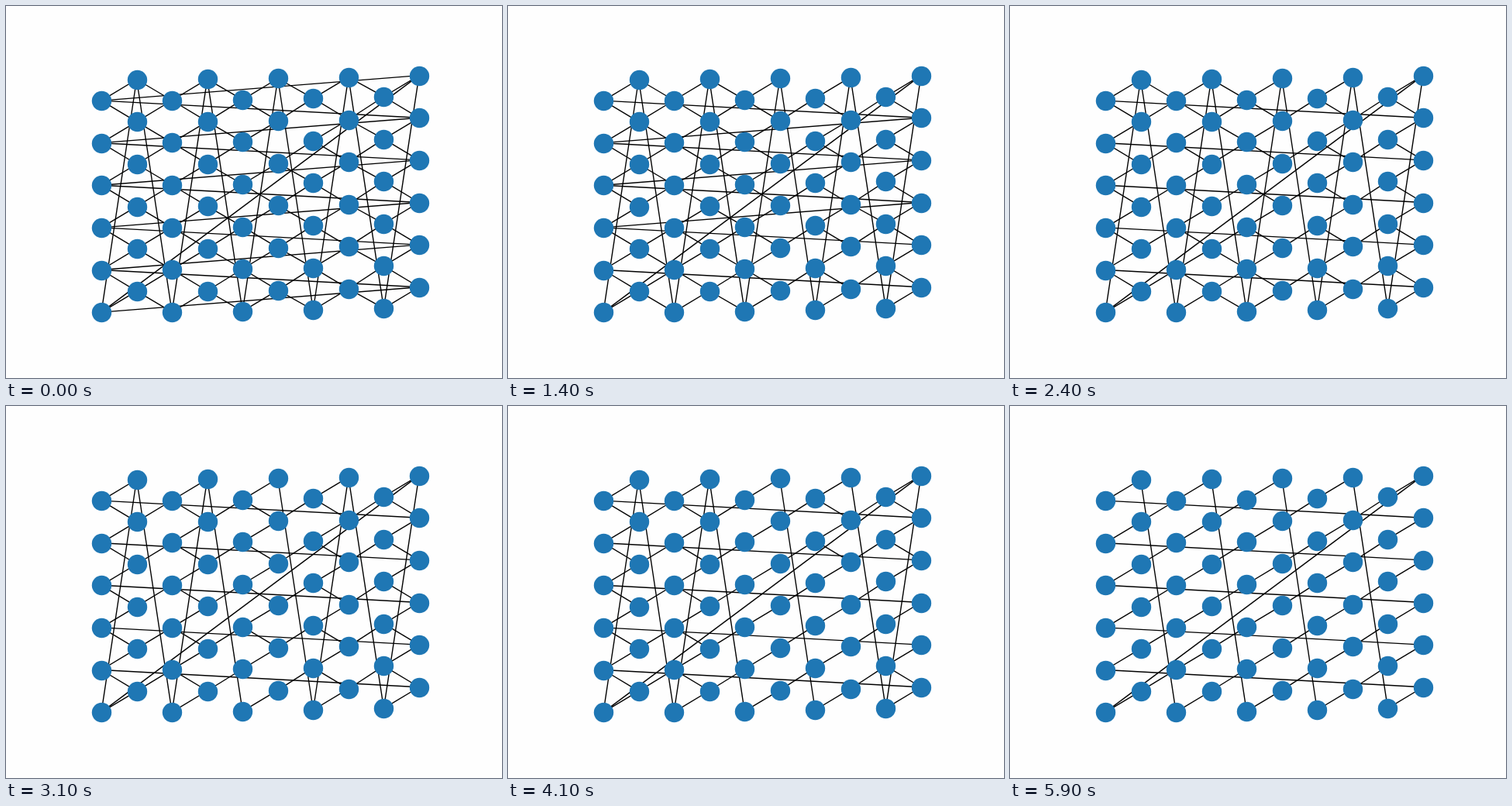
Write an HTML page with a canvas that moves like this. It is 640 px wide and 480 px high and loops after 6 s.

```html
<!DOCTYPE html>
<html lang="en">
<head>
<meta charset="utf-8">
<title>Thinning a circulant graph</title>
<style>
html, body { margin: 0; width: 100%; height: 100%; overflow: hidden; background: #fefefe; }
canvas { display: block; }
</style>
</head>
<body>
<canvas id="stage" width="640" height="480"></canvas>
<script>
const ctx = document.getElementById('stage').getContext('2d');
const COUNT = 60, COLS = 10, ROWS = 6;
const STEP_MS = 100, LOOP_MS = COUNT * STEP_MS;
const LEFT = 123.04, BOTTOM = 395.13, COL_GAP = 45.547, HALF_ROW = 27.306, SAG = 0.318;

// Node k is linked to k + 1 and k + 11 (mod 60).
const nodes = Array.from({ length: COUNT }, (_, k) => {
  const col = k % COLS, pair = Math.floor(col / 2);
  const row = (Math.floor(k / COLS) - pair + ROWS) % ROWS;
  const rise = 2 * (ROWS - 1 - row) + col % 2;
  return {
    x: LEFT + COL_GAP * col,
    y: BOTTOM - HALF_ROW * rise - SAG * pair ** 2
  };
});

// Odd links go first; in each half, removal spreads out from one centre.
function removalRank(k) {
  const odd = k % 2;
  const columnDelay = Math.floor((k + 6) % COLS / 2);
  const offset = Math.abs(Math.floor(k / COLS) - (odd ? 3.4 : 0.8));
  return (odd ? 0 : COUNT) + columnDelay + Math.min(offset, ROWS - offset);
}
const removal = [...nodes.keys()].sort((a, b) => removalRank(a) - removalRank(b));

function link(k, jump) {
  const a = nodes[k], b = nodes[(k + jump) % COUNT];
  ctx.beginPath();
  ctx.moveTo(a.x, a.y);
  ctx.lineTo(b.x, b.y);
  ctx.stroke();
}

// Discs sit on whole pixels, lines do not.
function disc({ x, y }) {
  ctx.beginPath();
  ctx.arc(Math.round(x) + 0.5, Math.round(y) + 0.5, 12.7, 0, 2 * Math.PI);
  ctx.fill();
}

function draw(time) {
  const removed = Math.floor((time % LOOP_MS) / STEP_MS) + 1;
  ctx.fillStyle = '#fefefe';
  ctx.fillRect(0, 0, 640, 480);
  ctx.strokeStyle = '#000';
  ctx.lineWidth = 1.39;
  nodes.forEach((_, k) => link(k, 1));
  removal.slice(removed).forEach(k => link(k, 11));
  ctx.fillStyle = '#1f77b4';
  nodes.forEach(disc);
}

const start = performance.now();
function tick() {
  draw(performance.now() - start);
  requestAnimationFrame(tick);
}
tick();
</script>
</body>
</html>
```
